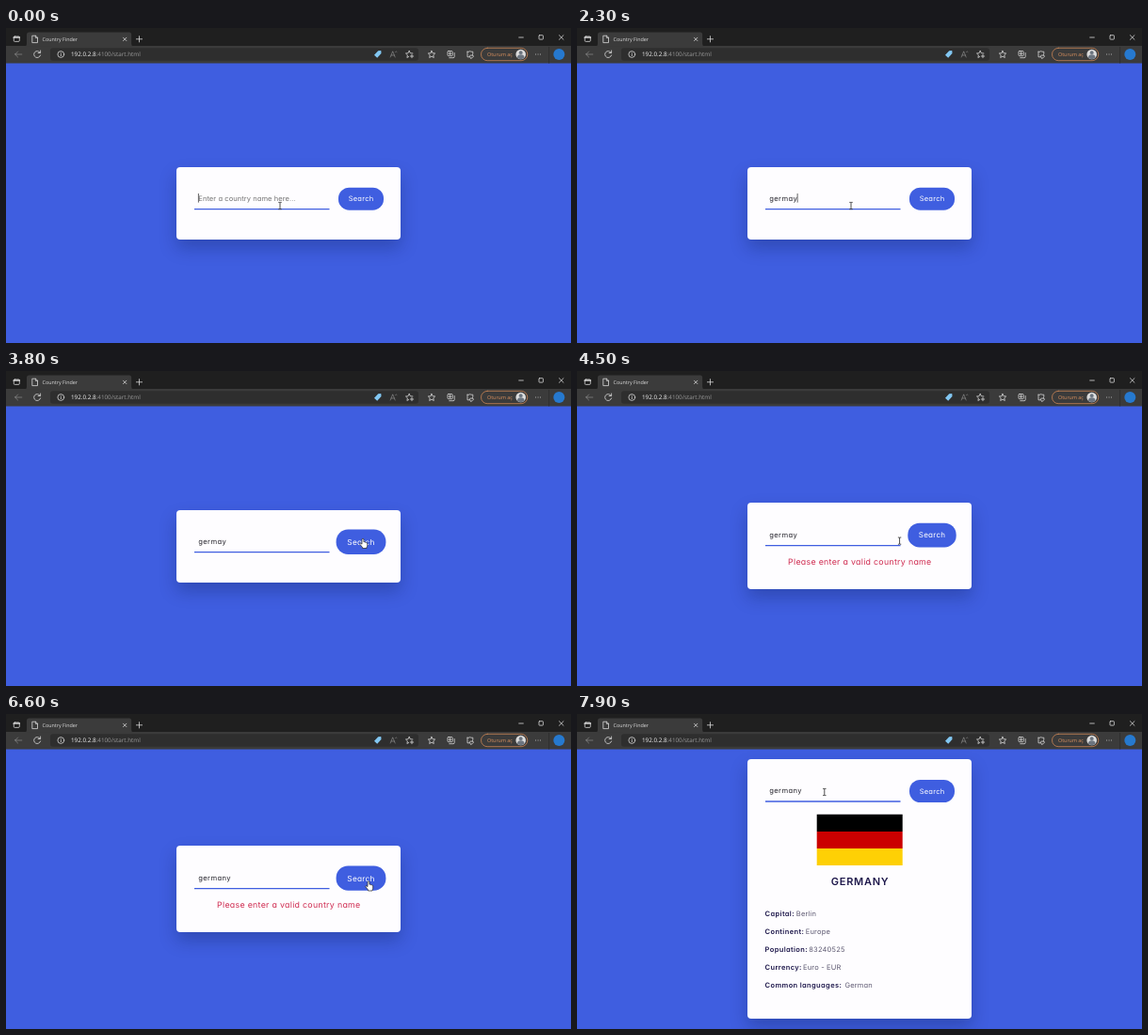
An HTML page that plays this animation: 600 px wide and 335 px high, repeating every 8 s.

```html
<!DOCTYPE html>
<html lang="en">
<head>
<meta charset="utf-8">
<title>Country Finder</title>
<style>
  html, body { margin: 0; width: 100%; height: 100%; overflow: hidden; background: #3f5ee0; }
  svg { position: absolute; left: 0; top: 0; width: 600px; height: 335px; text-rendering: geometricPrecision; }
  .card {
    position: absolute; left: 181.3px; width: 238.2px;
    border-radius: 4px; background: #fefdff;
    box-shadow: 0 9px 18px rgba(8, 21, 65, .27);
  }
  .ui { font: 5.4px "Open Sans", "Noto Sans", sans-serif; fill: #dedede; }
  .page { font: 7.5px Inter, "Noto Sans", sans-serif; font-feature-settings: "cv11"; fill: #1f194c; }
  .line { fill: none; stroke: #d8d8d8; stroke-width: .8; stroke-linecap: round; stroke-linejoin: round; }
  .dim { opacity: .45; }
  .typed { font-size: 7.6px; letter-spacing: .35px; fill: #25242c; }
  .hint { letter-spacing: .08px; fill: #757575; }
  .search { letter-spacing: .25px; fill: #fff; text-anchor: middle; }
  .error { font-size: 8.8px; letter-spacing: .3px; fill: #cf2b50; text-anchor: middle; }
  .name { font-size: 11px; font-weight: 600; letter-spacing: .75px; text-anchor: middle; }
  .label { font-weight: 600; letter-spacing: .36px; }
  .value { letter-spacing: .18px; fill: #5e5a72; }
</style>
</head>
<body>
<div class="card" id="card"></div>
<svg viewBox="0 0 600 335">
  <!-- page: coordinates below are relative to the top of the card -->
  <g id="content" class="page">
    <path d="M200 45.2H343.5" stroke="#3f5ee0" stroke-width="1.3"/>
    <text id="hint" class="hint" x="204.3" y="36.4">Enter a country name here...</text>
    <text id="typed" class="typed" x="204.3" y="36.4"></text>
    <path id="caret" d="M0 28.5v9.6" stroke="#222" stroke-width=".7"/>
    <g id="button">
      <rect x="-24" y="-12" width="48" height="24" rx="11.5" fill="#3f5ee0"/>
      <text class="search" y="2.7">Search</text>
    </g>
    <text id="error" class="error" x="300.3" y="65.2">Please enter a valid country name</text>
    <g id="result">
      <path d="M254.7 59h91v18.1h-91z" fill="#000"/>
      <path d="M254.7 77.1h91v18.1h-91z" fill="#cb0000"/>
      <path d="M254.7 95.2h91v18.1h-91z" fill="#fed005"/>
      <text class="name" x="300.6" y="134.3">GERMANY</text>
    </g>
  </g>

  <!-- browser window -->
  <g class="ui">
    <path d="M0 0H600V20H0z" fill="#1f1f1f"/>
    <path d="M0 19H600V37.5H0z" fill="#3b3b3b"/>
    <path d="M20 19.5q2-.3 2-2.5V7q0-2.6 2.6-2.6H130.6q2.6 0 2.6 2.6V17q0 2.2 2 2.5z" fill="#3b3b3b"/>
    <rect x="47" y="21.3" width="391" height="13.4" rx="3" fill="#2e2e2e"/>
    <g class="line">
      <rect x="8.3" y="9" width="6" height="5.4" rx="1"/>
      <path d="M8.3 10h6" stroke-width="1.7"/>
      <path d="M28.2 8.2h3.3l2 2v5.4h-5.3zM31.3 8.2v2.2h2.2"/>
      <path d="M124.5 10.2l3.4 3.4m0-3.4l-3.4 3.4"/>
      <path d="M138.4 11.8h6.2m-3.1-3.1v6.2"/>
      <path d="M544.7 10h4.6M587.4 7.7l4.6 4.6m0-4.6l-4.6 4.6"/>
      <rect x="566" y="7.7" width="4.4" height="4.4" rx=".6"/>
      <path class="dim" d="M16.8 28H9.6m3-3l-3 3 3 3"/>
      <path d="M36.2 26.2a3.5 3.5 0 1 0 .4 2.7M36.6 24v2.5h-2.5"/>
      <circle cx="58.3" cy="28" r="3.4"/>
      <path d="M58.3 27.7v1.9m0-3.4v.1"/>
      <path class="dim" d="M408.2 31l2.5-6.2 2.5 6.2m-4.1-2h3.2M413.6 25.4q1-.9 1.5 0"/>
      <path id="star" d="M452 24.3l1.1 2.4 2.6.3-1.9 1.8.5 2.7-2.3-1.3-2.3 1.3.5-2.7-1.9-1.8 2.6-.3z"/>
      <path d="M428.2 24.3l1.1 2.4 2.6.3M428.2 24.3l-1.1 2.4-2.6.3 1.9 1.8-.5 2.7 1.8-1M429.3 30h3.4m-1.7-1.7v3.4"/>
      <rect x="469" y="24.5" width="5.2" height="5.2" rx="1"/>
      <path d="M470.8 31.7h4.2q1.2 0 1.2-1.2v-4M470.1 27.1h3m-1.5-1.5v3"/>
      <path d="M490 25.2h2q.9-1.5 1.8 0h2v2.1q-1.4.8 0 1.7M490 25.2v5.6h2.5M493.2 31.6q-2.2-2.8.7-2.5 2.9-.3 2.5 1.2-.7 1.4-2.5 2z"/>
      <rect x="504.5" y="21.3" width="49.3" height="13.4" rx="6.7" stroke="#c98555"/>
    </g>
    <path d="M395.2 24.2l3.1-.2.2 3.1-4.3 4.6-3.2-3z" fill="#82c7f2"/>
    <text x="38.6" y="13.9">Country Finder</text>
    <text x="69" y="30.2" font-size="6.3" fill="#f5f5f5">192.0.2.8<tspan fill="#9b9b9b">:4100/start.html</tspan></text>
    <text x="511" y="30" style="fill:#dc925f">Oturum aç</text>
    <circle cx="546.7" cy="28" r="5.3" fill="#dcdcdc"/>
    <path d="M542.9 31.6a3.8 3.4 0 0 1 7.6 0 5.3 5.3 0 0 1-7.6 0z" fill="#6c7580"/>
    <circle cx="546.7" cy="26.2" r="1.9" fill="#6c7580"/>
    <path d="M562.5 28h.1m2.4 0h.1m2.4 0h.1" class="line" stroke-width="1.1"/>
    <path d="M576.6 20V37.5" stroke="#2c2c2c" stroke-width=".8"/>
    <circle cx="587.3" cy="28" r="6" fill="#2679cf"/>
  </g>

  <!-- pointer shapes, hot spot at 0,0 -->
  <g id="pointer" stroke-linejoin="round">
    <path id="beam" d="M-1.7-3.6h1.2q.5 0 .5.5V3.1q0 .5-.5.5h-1.2M1.7-3.6H.5q-.5 0-.5.5M1.7 3.6H.5Q0 3.6 0 3.1" fill="none" stroke="#222" stroke-width=".8"/>
    <path id="arrow" d="M0 0V7.2L1.7 5.7 2.9 8.4 4 7.9 2.9 5.3H5.2z" fill="#fff" stroke="#222" stroke-width=".7"/>
    <path id="hand" d="M-1 .6Q-1-.2 0-.2T.9.6V3.3q1-.5 1.4.3 1-.3 1.3.5 1.1-.2 1.1.9V7.2q0 1-.7 1.8V10H-.5V9L-3 6q-.6-1.2.5-1.3.7.1 1.5 1z" fill="#fff" stroke="#222" stroke-width=".7"/>
  </g>
</svg>
<script>
const LOOP = 8000;
const $ = id => document.getElementById(id);
const show = (id, on) => $(id).setAttribute('visibility', on ? 'inherit' : 'hidden');
const clamp = v => Math.min(1, Math.max(0, v));
const ease = u => u * u * (3 - 2 * u);

const facts = [
  ['Capital:', 'Berlin', 232.8], ['Continent:', 'Europe', 242.8],
  ['Population:', '83240525', 246.3], ['Currency:', 'Euro - EUR', 240],
  ['Common languages:', 'German', 284.4]
];

// card layouts: start time, top, height
const layouts = [[0, 147.5, 77.5], [3900, 140.4, 91.4], [6700, 47.8, 276.5]];

// field: time, text, caret index (-1 = not focused)
const edits = [
  [0, '', 0], [700, 'g', 1], [900, 'ge', 2], [1200, 'ger', 3], [1500, 'germ', 4],
  [1800, 'germa', 5], [2100, 'germay', 6], [3700, 'germay', -1], [4900, 'germay', 6],
  [5200, 'germay', 5], [5500, 'germany', 6], [6500, 'germany', -1]
];

// pointer: time, x, y
const path = [
  [0, 291, 189], [2800, 291, 189], [3500, 379, 178.5], [4300, 379, 178.5],
  [4900, 239.7, 186.6], [5900, 239.7, 186.6], [6400, 385, 178], [6700, 385, 178],
  [6800, 381, 182], [7000, 381, 182], [7700, 262.8, 83], [LOOP, 262.8, 83]
];
const hovers = [[3250, 4465], [6248, 6700]];

function addText(kind, x, y, text) {
  const el = document.createElementNS('http://www.w3.org/2000/svg', 'text');
  el.setAttribute('class', kind);
  el.setAttribute('x', x);
  el.setAttribute('y', y);
  el.textContent = text;
  $('result').append(el);
}
facts.forEach(([label, value, x], i) => {
  const y = 167.2 + i * 19;
  addText('label', 199.6, y, label);
  addText('value', x, y, value);
});

const latest = (list, t) => list.findLast(item => item[0] <= t);

function pointerAt(t) {
  const i = path.findIndex(p => p[0] > t);
  const [t0, x0, y0] = path[i - 1], [t1, x1, y1] = path[i];
  const u = ease((t - t0) / (t1 - t0));
  return [x0 + (x1 - x0) * u, y0 + (y1 - y0) * u];
}

function drawField(t) {
  const [since, text, index] = latest(edits, t);
  const typed = $('typed');
  if (typed.textContent !== text) typed.textContent = text;
  show('hint', !text);
  show('caret', index >= 0 && (t - since) % 1000 < 500);
  const width = index > 0 ? typed.getSubStringLength(0, index) : 0;
  $('caret').setAttribute('transform', `translate(${204.4 + width})`);
}

function drawPointer(t, top) {
  const [x, y] = pointerAt(t);
  const inside = (left, right, from, to) =>
    x > left && x < right && y - top > from && y - top < to;
  const shape = inside(200, 343.5, 21, 48) ? 'beam'
    : inside(352, 402, 22, 47) ? 'hand' : 'arrow';
  for (const id of ['beam', 'hand', 'arrow']) show(id, id === shape);
  $('pointer').setAttribute('transform', `translate(${x} ${y})`);
}

function draw(t) {
  const layout = latest(layouts, t);
  const [, top, height] = layout;
  $('card').style.top = top + 'px';
  $('card').style.height = height + 'px';
  $('content').setAttribute('transform', `translate(0 ${top})`);
  show('error', layout === layouts[1]);
  show('result', layout === layouts[2]);

  const grow = Math.max(...hovers.map(([a, b]) =>
    Math.min(clamp((t - a) / 100), 1 - clamp((t - b) / 100))));
  $('button').setAttribute('transform', `translate(377 34.2) scale(${1 + .1 * ease(grow)})`);

  drawField(t);
  drawPointer(t, top);
}

function tick() {
  draw(performance.now() % LOOP);
  requestAnimationFrame(tick);
}
tick();
</script>
</body>
</html>
```
